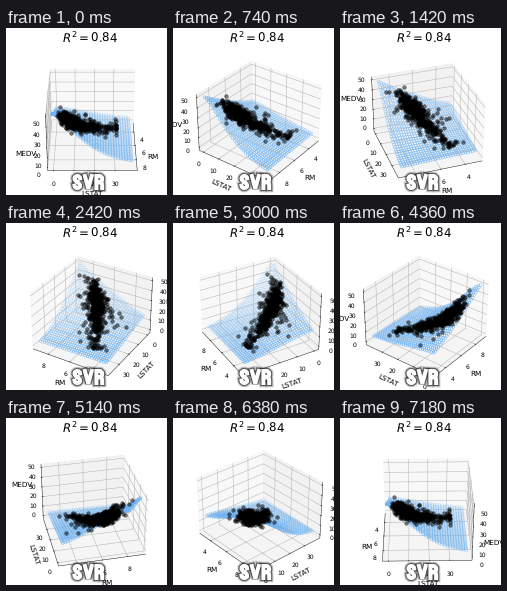
Recreate the animation shown at these times as a matplotlib script. Size 161 px wide and 167 px high, loop 7.2 s.

```python
import numpy as np
import matplotlib.pyplot as plt
from matplotlib.animation import FuncAnimation
from matplotlib.collections import LineCollection, PolyCollection
from matplotlib.patches import PathPatch
from matplotlib.path import Path

plt.rcParams["text.hinting"] = "none"
plt.rcParams["path.snap"] = False
plt.rcParams["font.family"] = "DejaVu Sans"

W, H, DPI = 161, 167, 64
PX = 72 / DPI            # points per pixel
PT = 0.6 * PX            # scale of the plot's nominal point sizes
FRAMES, INTERVAL = 360, 20

# Camera: orthonormal view with mild perspective
CX, CY, ZOOM, DIST = 86.5, 90.5, 732, 10
ELEV = np.radians(32)
BOX = np.array([1.143, 1.143, 0.857])
LO = np.array([2.7, -1.9, -2.0])
HI = np.array([9.3, 39.9, 52.0])
EDGE = 0.5 + 1 / 48      # half size of the padded cube
TICK_PAD, LABEL_PAD = 0.101, 0.22

TICKS = [range(4, 9, 2), range(0, 31, 10), range(0, 51, 10)]
NAMES = ["RM", "LSTAT", "MEDV"]
FLIP = [1, 0, 0]         # dimension turned to the front for each axis line


def unit(points):
    return (np.asarray(points, float) - LO) / (HI - LO) - 0.5


def project(points, azim):
    x, y, z = np.moveaxis(np.asarray(points) * BOX, -1, 0)
    c, s = np.cos(azim), np.sin(azim)
    near = c * x + s * y
    depth = DIST - near * np.cos(ELEV) - z * np.sin(ELEV)
    up = z * np.cos(ELEV) - near * np.sin(ELEV)
    px = CX + ZOOM * (c * y - s * x) / depth
    py = CY - ZOOM * up / depth
    return np.stack([px, py], -1), depth


def model(rm, lstat):
    r = np.clip((rm - 3) / 6, 0, 1)
    l = lstat / 38
    return 1 + (15 + 34 * r**1.25) * np.exp(-(1.2 + 1.6 * r) * l**1.4)


def housing(n=506):
    rng = np.random.default_rng(4)
    a, b, c = rng.standard_normal((3, n))
    lstat = np.clip(np.exp(2.37 + 0.55 * a), 1.8, 31)
    rm = 6.3 - 0.085 * (lstat - 12) + 0.32 * b + 0.05 * b**3
    rm = np.clip(rm + 0.25 * np.exp(-lstat / 5), 3.56, 8.78)
    fit = model(rm, lstat)
    medv = np.clip(fit * (1 + 0.13 * np.clip(c, -2, 2)), 5, 50)
    return np.stack([rm, lstat, medv], -1)


def moved(p, dim, value):
    q = p.copy()
    q[dim] = value
    return q


def flipped(p, dim):
    return moved(p, dim, -p[dim])


def pushed(p, axis, pad):
    q = p + np.sign(p) * pad
    q[axis] = p[axis]
    return q


data = unit(housing())
gx, gy = np.meshgrid(np.linspace(3, 9, 30), np.linspace(0, 38, 30))
sheet = unit(np.stack([gx, gy, model(gx, gy)], -1).reshape(-1, 3))
tick_pos = []
for k, values in enumerate(TICKS):
    tick_pos.append([(v - LO[k]) / (HI[k] - LO[k]) - 0.5 for v in values])

fig = plt.figure(figsize=(W / DPI, H / DPI), dpi=DPI, facecolor="white")
ax = fig.add_axes([0, 0, 1, 1])
ax.set_xlim(0, W)
ax.set_ylim(H, 0)
ax.axis("off")

panes = PolyCollection([], zorder=1, linewidths=PT, facecolors=[
    (v, v, v, 0.5) for v in (0.95, 0.9, 0.925)], edgecolors=[
    (v, v, v, 0.5) for v in (0.95, 0.9, 0.925)])
grid = LineCollection([], zorder=2, colors="#b0b0b0", linewidths=0.8 * PT)
lines = LineCollection([], zorder=3, colors="black", linewidths=0.7 * PT)
for item in (panes, grid, lines):
    ax.add_collection(item, autolim=False)

tick_texts = [[ax.text(0, 0, str(v), size=10 * PT, ha="center", va="top",
                       zorder=4) for v in values] for values in TICKS]
name_texts = [ax.text(0, 0, s, size=12 * PT, ha="center", va="center",
                      zorder=4) for s in NAMES]

dots = ax.scatter(sheet[:, 0], sheet[:, 1], s=20 * PT**2, facecolors="none",
                  edgecolors="#70b3f0", linewidths=0.6, zorder=5)
homes, = ax.plot([], [], "o", color="k", alpha=0.5, ms=6 * PT, mew=PT,
                 zorder=15)
ax.text(84, 8.6, "$R^2 = 0.84$", size=19.5 * PT, ha="center", va="center",
        zorder=20)


def draw_caption():
    M, L, C = Path.MOVETO, Path.LINETO, Path.CURVE3
    s = Path([(74.1, 150.4), (74.1, 148), (71.3, 148), (68.5, 148),
              (68.5, 150.4), (68.5, 152.6), (71.3, 154), (74.1, 155.4),
              (74.1, 157.8), (74.1, 160), (71.3, 160), (68.5, 160),
              (68.5, 157.6)], [M] + [C] * 12)
    v = Path([(78.9, 148), (82.3, 160.5), (85.7, 148)], [M, L, L])
    r = Path([(90.4, 160), (90.4, 148), (93.2, 148), (96.2, 148),
              (96.2, 151), (96.2, 154), (93.2, 154),
              (92.8, 154.2), (96.2, 154.2), (96.2, 157), (96.2, 160)],
             [M, L, L, C, C, C, C, M, C, C, L])
    glyphs = [(s, "round"), (v, "bevel"), (r, "miter")]
    layers = [(9, "black", 0.12), (7.4, "black", 0.25),
              (5.8, "#333333", 0.75), (4, "white", 1)]
    for z, (width, color, alpha) in enumerate(layers):
        for glyph, join in glyphs:
            ax.add_patch(PathPatch(
                glyph, fill=False, ec=color, alpha=alpha, lw=width * PX,
                capstyle="projecting", joinstyle=join, zorder=30 + z))


def update(frame):
    azim = np.radians(frame)
    eps = 1e-9
    back = EDGE * np.array([1 if np.cos(azim) < -eps else -1,
                            1 if np.sin(azim) < -eps else -1, -1])

    walls, mesh, strokes = [], [], []
    for k in range(3):
        m, n = (k + 1) % 3, (k + 2) % 3
        side = flipped(back, m)
        walls.append([back, side, flipped(side, n), flipped(back, n)])

        edge = flipped(back, FLIP[k])
        ends = [moved(edge, k, -EDGE), moved(edge, k, EDGE)]
        strokes.append(ends)
        for t, text in zip(tick_pos[k], tick_texts[k]):
            base = moved(back, k, t)
            mesh.append([flipped(base, m), base, flipped(base, n)])
            p = moved(edge, k, t)
            f = FLIP[k]
            step = np.sign(p[f]) / 12
            strokes.append([moved(p, f, p[f] + 0.1 * step),
                            moved(p, f, p[f] - 0.2 * step)])
            text.set_position(project(pushed(p, k, TICK_PAD), azim)[0])

        label = pushed(moved(edge, k, 0), k, LABEL_PAD)
        name_texts[k].set_position(project(label, azim)[0])
        if len(NAMES[k]) > 4:
            a, b = project(ends, azim)[0]
            angle = np.degrees(np.arctan2(a[1] - b[1], b[0] - a[0])) % 180
            name_texts[k].set_rotation(angle - 180 if angle > 90 else angle)

    panes.set_verts(list(project(walls, azim)[0]))
    grid.set_segments(list(project(mesh, azim)[0]))
    lines.set_segments(list(project(strokes, azim)[0]))

    # Far dots first, and fainter
    xy, depth = project(sheet, azim)
    order = np.argsort(-depth)
    far = (depth - depth.min()) / np.ptp(depth)
    rgba = np.tile([0x70 / 255, 0xB3 / 255, 0xF0 / 255, 1], (len(xy), 1))
    rgba[:, 3] = 1 - 0.7 * far
    dots.set_offsets(xy[order])
    dots.set_edgecolors(rgba[order])

    homes.set_data(*project(data, azim)[0].T)
    return []


draw_caption()
anim = FuncAnimation(fig, update, frames=FRAMES, interval=INTERVAL,
                     repeat=True, repeat_delay=0, blit=False)
plt.show()
```
